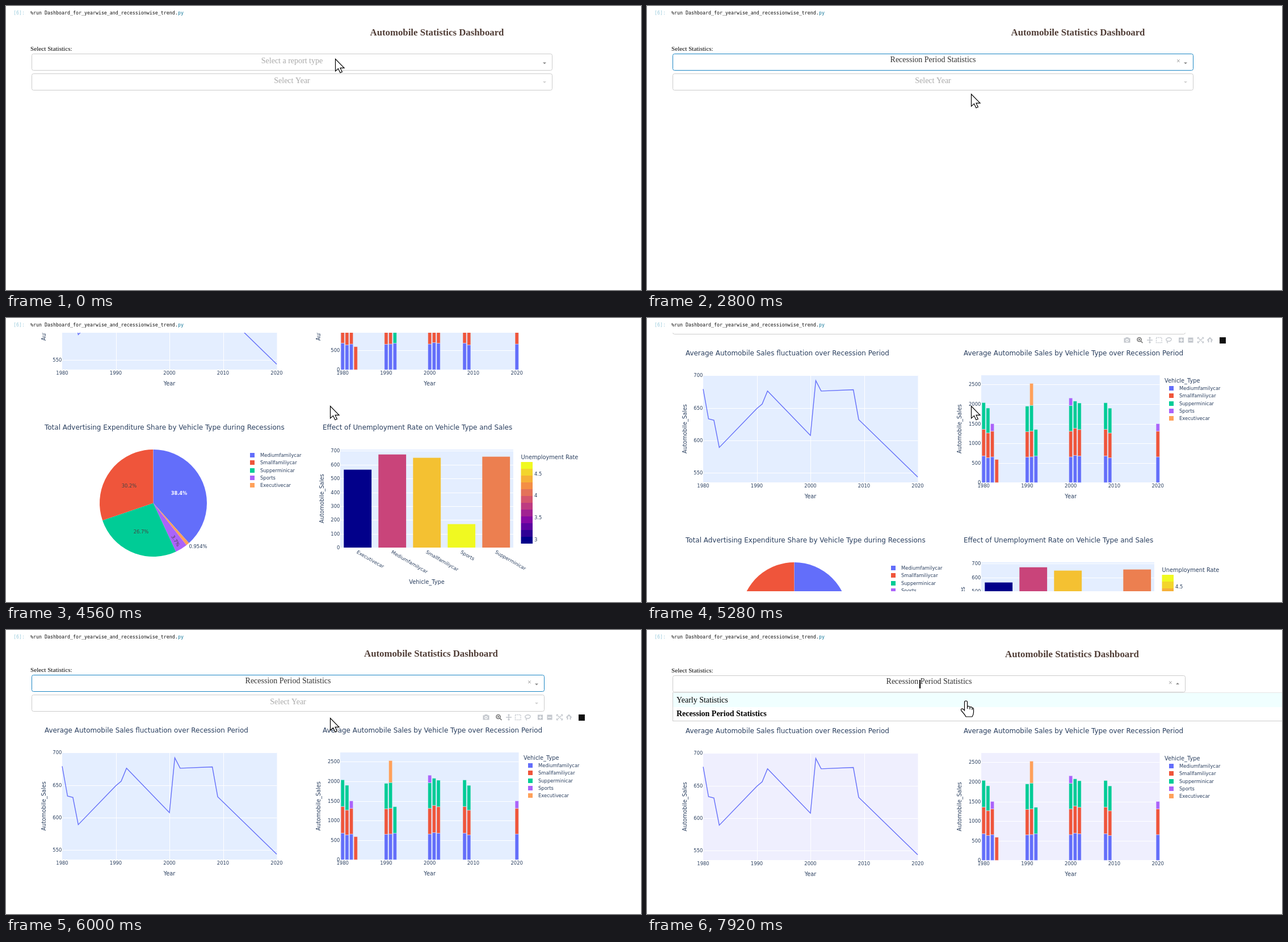
Write an HTML page with a canvas that moves like this. It is 1119x501 px and loops after 8000 ms.

```html
<!DOCTYPE html>
<html lang="en">
<head>
<meta charset="utf-8">
<title>Dashboard</title>
<style>
html, body { margin: 0; width: 100%; height: 100%; overflow: hidden; background: #fff; }
canvas { display: block; }
</style>
</head>
<body>
<canvas id="stage" width="1119" height="501"></canvas>
<script>
const ctx = document.getElementById('stage').getContext('2d');
const W = 1119, H = 501, LOOP = 8000, STEP = 80;
const SERIF = '"Liberation Serif", "Times New Roman", serif';
const SANS = '"DejaVu Sans", Verdana, sans-serif';
const MONO = '"DejaVu Sans Mono", monospace';
const INK = '#2a3f5f', GREY = '#c4c8ce';
const COLORS = ['#636efa', '#ef553b', '#00cc96', '#ab63fa', '#ffa15a'];
const TYPES = ['Mediumfamilycar', 'Smallfamiliycar', 'Supperminicar', 'Sports', 'Executivecar'];
const PLASMA = [[2, 0, 138], [126, 3, 168], [204, 71, 120], [248, 149, 64], [240, 249, 33]];

// Event times in ms
const OPEN_1 = 640, CHOOSE = 2000, CHARTS = 2960, TOOLBAR = 3440, OPEN_2 = 7040;
const TOP = -4, BOTTOM = 315;

// Yearly sales average and the vehicle types sold, from the first year of each recession on
const RECESSIONS = [
  { start: 1980, sales: [679, 633, 631, 589], sold: ['012', '012', '013', '1'] },
  { start: 1990, sales: [649, 656, 676], sold: ['012', '0124', '02'] },
  { start: 2000, sales: [607.5, 692, 676], sold: ['0123', '012', '012'] },
  { start: 2008, sales: [678, 632], sold: ['012', '012'] },
  { start: 2020, sales: [543.5], sold: ['013'] }];
const YEARS = RECESSIONS.flatMap(r =>
  r.sales.map((sales, i) => ({ year: r.start + i, sales, sold: [...r.sold[i]].map(Number) })));
// Type, percent
const SHARES = [[0, 38.4], [4, 0.954], [3, 3.7], [2, 26.7], [1, 30.2]];
// Type, sales, place on the colour scale
const RATES = [[4, 564, 0], [0, 674, 0.49], [1, 650, 0.86], [3, 170, 1], [2, 658, 0.68]];

const ARROW = new Path2D('M.5 .5V22L5.5 17.4L9 24.8L12.4 23.2L9 16.4H16Z');
const HAND = new Path2D('M-2.5 2.5Q-2.5 0 0 0Q2.5 0 2.5 2.5V10Q5 8.5 7 11Q10 10 11 12.5Q13.5 12 13.5 15V20' +
  'Q13.5 24 11 28H0Q-2 24 -8 17.5Q-9.5 15 -7.5 14Q-5.5 13 -2.5 17ZM2.5 10V14M7 11V15M11 12.5V16');

const progress = (t, from, to) => Math.min(1, Math.max(0, (t - from) / (to - from)));
const smooth = p => p * p * (3 - 2 * p);
const mix = (a, b, p) => a + (b - a) * p;

// Wheel down slows to a stop, the way back decays to zero
function scrollAt(t) {
  const down = progress(t, 4020, 4560);
  const y = t < 5128 ? mix(BOTTOM, TOP, (1 - down) ** 2) : BOTTOM * Math.exp((5128 - t) / 151.6);
  return Math.round(y);
}

function pointerAt(t) {
  const first = smooth(progress(t, 640, 1600));
  const up = smooth(progress(t, 6320, 6800));
  const last = smooth(progress(t, 7120, 7440));
  return [580 - 9 * first - 5 * up - 4 * last, 93 + 62 * first - 57 * up + 27 * last].map(Math.round);
}

function plasma(p) {
  const f = p * (PLASMA.length - 1), i = Math.min(Math.floor(f), PLASMA.length - 2);
  return `rgb(${PLASMA[i].map((v, c) => Math.round(mix(v, PLASMA[i + 1][c], f - i)))})`;
}

function text(s, x, y, font, color, align = 'left') {
  ctx.font = font;
  ctx.fillStyle = color;
  ctx.textAlign = align;
  ctx.fillText(s, x, y);
}

// Chart text, centred vertically on y
function label(s, x, y, size = 8.4, align = 'left', color = INK, weight = '') {
  text(s, x, y + size * 0.36, `${weight} ${size}px ${SANS}`, color, align);
}

function turned(s, x, y, angle, size, align, color) {
  ctx.save();
  ctx.translate(x, y);
  ctx.rotate(angle);
  label(s, 0, 0, size, align, color);
  ctx.restore();
}

function rect(x, y, w, h, color) {
  ctx.fillStyle = color;
  ctx.fillRect(x, y, w, h);
}

function shape(path, color) {
  ctx.fillStyle = color;
  ctx.fill(path);
}

function stroke(path, color, width = 1.4) {
  ctx.strokeStyle = color;
  ctx.lineWidth = width;
  ctx.stroke(path);
}

function tri(x, y, dir, color) {
  shape(new Path2D(`M${x - 3} ${y - 1.5 * dir}h6l-3 ${3 * dir}z`), color);
}

function field(y, right, border) {
  const box = new Path2D();
  box.roundRect(45.5, y + 0.5, right - 46, 29, 3);
  shape(box, '#fff');
  stroke(box, border, 1);
}

function drawForm(s) {
  const right = s.charts ? 949 : 963, mid = (45 + right) / 2, lit = s.focused && !s.open;
  text('Automobile Statistics Dashboard', s.charts ? 749 : 759.5, 48, `bold 16.8px ${SERIF}`, '#503d36', 'center');
  text('Select Statistics:', 43, 74.5, `11.2px ${SERIF}`, '#000');

  field(80, right, lit ? '#1a86c4' : '#ccc');
  if (s.chosen) {
    text('Recession Period Statistics', mid, 95, `14px ${SERIF}`, '#333', 'center');
    text('×', right - 26.5, 97, `12px ${SERIF}`, '#888', 'center');
  } else {
    text('Select a report type', mid, 97, `14px ${SERIF}`, '#aaa', 'center');
  }
  tri(right - 14, s.open ? 94.5 : 97, s.open ? -1 : 1, '#888');
  if (s.open) rect(mid - 17, 88, 2, 15, '#000');

  field(115, right, '#ccc');
  text('Select Year', mid, 131.5, `14px ${SERIF}`, '#aaa', 'center');
  tri(right - 14, 130.5, 1, '#d0d0d0');
}

function drawMenu(s) {
  rect(45, 110, W, 51, '#fff');
  rect(46, s.second ? 136 : 110, W, s.second ? 24 : 26, '#f0ffff');
  rect(45, 110, W, 1, '#e6e6e6');
  rect(45, 110, 1, 51, '#ccc');
  rect(45, 160, W, 1, '#ccc');
  text('Yearly Statistics', 52, 128, `14px ${SERIF}`, '#000');
  text('Recession Period Statistics', 52, 152, `${s.chosen ? 'bold ' : ''}14px ${SERIF}`, '#000');
}

// Title, background, horizontal grid with tick labels and the upright axis title
function plot({ title, titleX, titleY, x, y, w, h, bg, from, to, by, Y, axisX }) {
  label(title, titleX, titleY, 11.93);
  rect(x, y, w, h, bg);
  for (let v = from; v <= to; v += by) {
    rect(x, Math.round(Y(v)), w, 1, '#fff');
    label(v, x - 0.7, Y(v), 8.4, 'right');
  }
  turned('Automobile_Sales', axisX, y + h / 2, -Math.PI / 2, 9.8, 'center');
}

function yearAxis(X) {
  for (let year = 1980; year <= 2020; year += 10) label(year, X(year), 412, 8.4, 'center');
  label('Year', X(2000), 430, 9.8, 'center');
}

function legend(x, y) {
  TYPES.forEach((type, i) => {
    const cy = y + i * 13.35;
    rect(x, Math.round(cy - 4), 8, 8, COLORS[i]);
    label(type, x + 18, cy);
  });
}

function drawLineChart(bg) {
  const X = year => 99 + (year - 1980) * 9.45, Y = v => 217.4 + (700 - v) * 1.144;
  plot({ title: 'Average Automobile Sales fluctuation over Recession Period', titleX: 68, titleY: 178,
    x: 99, y: 217, w: 378.5, h: 189, bg, from: 550, to: 700, by: 50, Y, axisX: 66 });
  for (const year of [1990, 2000, 2010]) rect(Math.round(X(year)), 217, 1, 189, '#fff');
  const line = new Path2D();
  for (const { year, sales } of YEARS) line.lineTo(X(year), Y(sales));
  stroke(line, COLORS[0]);
  yearAxis(X);
}

// Family cars sell near the yearly average; Sports and Executive have their own level
function soldCount(type, { sales, sold }) {
  if (type === 3) return 190;
  if (type === 4) return 560;
  return sold.includes(3) ? 655 : sales;
}

function drawStackChart(bg) {
  const X = year => 593.2 + (year - 1980) * 7.675, Y = v => 406.3 - v * 0.0692;
  plot({ title: 'Average Automobile Sales by Vehicle Type over Recession Period', titleX: 558, titleY: 178,
    x: 589, y: 217, w: 314.5, h: 189, bg, from: 0, to: 2500, by: 500, Y, axisX: 550 });
  for (const entry of YEARS) {
    let base = 0;
    for (const type of entry.sold) {
      const top = base + soldCount(type, entry), bar = new Path2D();
      bar.rect(X(entry.year) - 3.1, Y(top), 6.2, Y(base) - Y(top));
      shape(bar, COLORS[type]);
      stroke(bar, bg, 0.5);
      base = top;
    }
  }
  yearAxis(X);
  label('Vehicle_Type', 912, 226, 9.8);
  legend(920, 240);
}

function drawPie() {
  const cx = 259.5, cy = 641.5, r = 94.5;
  label('Total Advertising Expenditure Share by Vehicle Type during Recessions', 68, 508, 11.98);
  let a = -Math.PI / 2;
  for (const [type, share] of SHARES) {
    const end = a + share / 100 * Math.PI * 2, slice = new Path2D();
    slice.moveTo(cx, cy);
    slice.arc(cx, cy, r, a, end);
    shape(slice, COLORS[type]);
    a = end;
  }
  label('38.4%', 305, 624, 8.2, 'center', '#fff', 'bold');
  label('30.2%', 217, 611, 8.4, 'center', '#444');
  label('26.7%', 238, 691.5, 8.4, 'center', '#444');
  turned('3.7%', 299, 708, 1.05, 8.4, 'center', '#444');
  label('0.954%', 322.5, 718);
  legend(430, 557);
}

function drawRateChart(bg) {
  const Y = v => 720 - v * 0.2437;
  plot({ title: 'Effect of Unemployment Rate on Vehicle Type and Sales', titleX: 558, titleY: 508,
    x: 589, y: 547, w: 305, h: 173, bg, from: 0, to: 700, by: 100, Y, axisX: 556 });
  RATES.forEach(([type, sales, rate], i) => {
    const x = 619.7 + i * 61;
    rect(x - 24.4, Y(sales), 48.8, 720 - Y(sales), plasma(rate));
    turned(TYPES[type], x - 1, 727, Math.PI / 6, 8.4, 'left');
  });
  label('Vehicle_Type', 741.5, 780, 9.8, 'center');
  label('Unemployment Rate', 907.5, 560, 9.8);
  for (let i = 0; i < 12; i++) rect(907.5, 569 + i * 12, 20.5, 12, plasma(1 - i / 11));
  for (let i = 0; i < 4; i++) label(3 + i / 2, 931, 706 - i * 38.8);
}

function icon(x, path, color = GREY, width = 1.4) {
  ctx.save();
  ctx.translate(x, 155);
  stroke(new Path2D(path), color, width);
  ctx.restore();
}

function drawToolbar() {
  rect(840.5, 151.5, 11, 8, GREY);
  rect(843.5, 150, 5, 2, GREY);
  icon(846, 'M-2 .5A2 2 0 1 0 2 .5A2 2 0 1 0 -2 .5', '#fff', 1.3);
  icon(868, 'M3 -1A3.5 3.5 0 1 1 -4 -1A3.5 3.5 0 1 1 3 -1M2 1.5L5.5 5M-2 -1H1M-.5 -2.5V.5', '#777', 1.7);
  icon(886, 'M0 -5V5M-5 0H5M-1.5 -3.5L0 -5L1.5 -3.5M-1.5 3.5L0 5L1.5 3.5');
  ctx.setLineDash([2, 1.4]);
  icon(902, 'M-4.5 -4.5H5V4.5H-4.5Z');
  ctx.setLineDash([]);
  icon(919, 'M-2 2Q-6 -1 -3 -3Q1 -5.5 4.5 -3Q6.5 0 2 2H-2Q-3.5 4 -1 5');
  for (const x of [937, 953.5]) rect(x, 150.5, 9, 9, GREY);
  icon(941.5, 'M-3 0H3M0 -3V3', '#fff');
  icon(958, 'M-3 0H3', '#fff');
  icon(975.5, 'M-5 -2V-4.5H-2.5M2.5 -4.5H5V-2M5 2V4.5H2.5M-2.5 4.5H-5V2M-3.5 -3L3.5 3M3.5 -3L-3.5 3');
  icon(992, 'M-4.5 .5L0 -4L4.5 .5M-2.5 0V4M2.5 0V4', GREY, 2);
  rect(1009, 150, 11, 11, '#111');
}

function drawPointer(x, y, path) {
  ctx.save();
  ctx.translate(x, y);
  shape(path, '#fff');
  stroke(path, '#000', 1.2);
  ctx.restore();
}

function drawCommand() {
  const font = `8.3px ${MONO}`;
  text('[6]:', 13, 15, font, '#9bcbdd');
  text('%run Dashboard_for_yearwise_and_recessionwise_trend.', 43, 15, font, '#111');
  text('py', 303, 15, font, '#167a9c');
}

function draw(t) {
  const scroll = scrollAt(t), [px, py] = pointerAt(t);
  const s = {
    open: (t >= OPEN_1 && t < CHOOSE) || t >= OPEN_2,
    focused: t >= OPEN_1,
    chosen: t >= CHOOSE,
    charts: t >= CHARTS
  };
  const overMenu = s.open && py + scroll > 110;
  s.second = overMenu ? py + scroll >= 136 : s.chosen;

  rect(0, 0, W, H, '#fff');
  drawCommand();
  ctx.save();
  ctx.beginPath();
  ctx.rect(0, 26, W, 456);
  ctx.clip();
  ctx.translate(0, -scroll);
  drawForm(s);
  if (s.charts) {
    const bg = t >= OPEN_2 ? '#efeffe' : '#e4eeff';
    drawLineChart(bg);
    drawStackChart(bg);
    drawPie();
    drawRateChart(bg);
    if (t >= TOOLBAR && py > 140) drawToolbar();
  }
  if (s.open) drawMenu(s);
  ctx.restore();
  drawPointer(px, py, overMenu ? HAND : ARROW);
}

function tick(now) {
  draw(Math.floor(now % LOOP / STEP) * STEP);
  requestAnimationFrame(tick);
}
draw(0);
requestAnimationFrame(tick);
</script>
</body>
</html>
```
